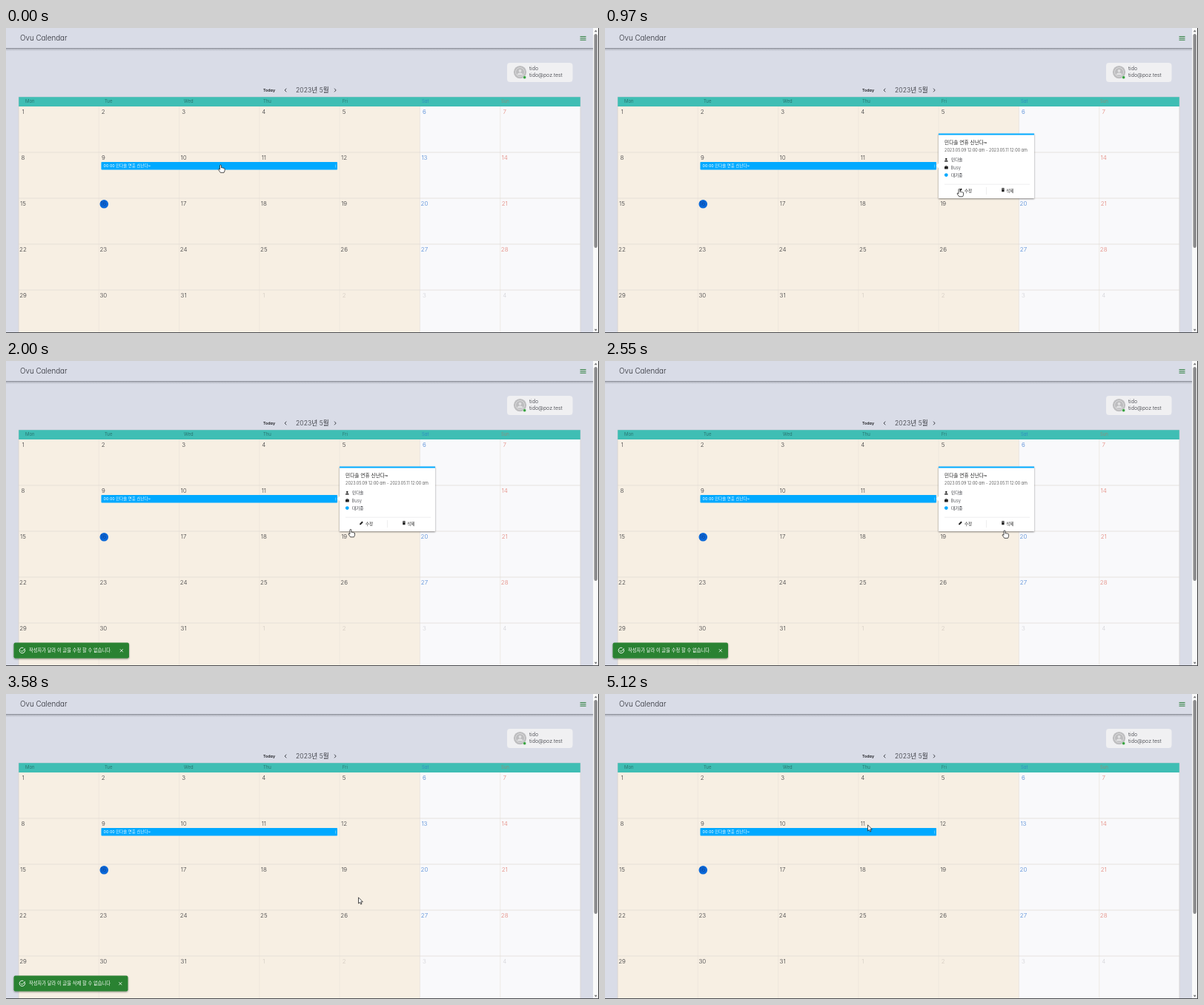
These frames come from a looping animation (800 by 412 pixels, 5150 ms). An HTML page:

```html
<!DOCTYPE html>
<html lang="ko">
<head>
<meta charset="utf-8">
<title>Calendar</title>
<style>
html, body { margin: 0; width: 100%; height: 100%; overflow: hidden; background: #d9dce7; }
svg { display: block; width: 100vw; height: 100vh; }
text {
  font-family: Inter, "Noto Sans CJK KR", "Noto Sans CJK", sans-serif;
  font-feature-settings: "cv11"; font-weight: 300; white-space: pre;
}
</style>
</head>
<body>
<svg id="stage" viewBox="0 0 800 412" preserveAspectRatio="none">
  <defs>
    <linearGradient id="drop" x2="0" y2="1">
      <stop offset="0" stop-color="#7c7f89"/>
      <stop offset=".35" stop-color="#b4b7c1"/>
      <stop offset="1" stop-color="#d9dce7"/>
    </linearGradient>
    <filter id="soft" x="-10%" y="-10%" width="120%" height="130%">
      <feDropShadow dx="0" dy="1" stdDeviation="1.2" flood-color="#000" flood-opacity=".45"/>
    </filter>
  </defs>
  <g id="page"></g>
  <g id="popup"></g>
  <g id="toast"></g>
  <circle id="ring" fill="#fff" fill-opacity=".6" stroke="#45c6ea" stroke-width="2.2"/>
  <g id="cursor" stroke="#222" stroke-width=".8" stroke-linejoin="round" fill="#fff">
    <path id="arrow" d="M0 0V8.2L1.9 6.5 3.2 9.3 4.5 8.7 3.3 6H5.8Z"/>
    <path id="hand" d="M-1 .9Q-1-.1 0-.1T1 .9V3.9Q2 3.2 2.7 4.1 3.7 3.5 4.3 4.5 5.5 4.2 5.6 5.4V7.3Q5.4 9 4.5 10.3H-.2Q-1.5 8.5-2.8 6.6-3.1 5.4-2 5.4L-1 6.3Z"/>
  </g>
</svg>
<script>
const LOOP = 5150;
const $ = id => document.getElementById(id);
const rect = (x, y, w, h, fill, more = '') =>
  `<rect x="${x}" y="${y}" width="${w}" height="${h}" fill="${fill}" ${more}/>`;
const line = (d, color, w = 0.6) =>
  `<path d="${d}" fill="none" stroke="${color}" stroke-width="${w}"/>`;
const shape = (d, fill) => `<path d="${d}" fill="${fill}"/>`;
const dot = (x, y, r, fill, more = '') =>
  `<circle cx="${x}" cy="${y}" r="${r}" fill="${fill}" ${more}/>`;
const label = (x, y, size, s, fill = '#33353b', more = '') =>
  `<text x="${x}" y="${y}" font-size="${size}" fill="${fill}" ${more}>${s}</text>`;

const LEFT = 17, TOP = 106, COL = 758 / 7, ROW = 62;
const PERSON = '민다솔';
const TITLE = PERSON + ' 연휴 신난다~';
const BLUE = '#00a9ff';

function drawTop() {
  return rect(0, 0, 800, 412, '#d9dce7') +
    rect(0, 27, 792, 4, 'url(#drop)') +
    label(19, 16.6, 9.8, 'Ovu Calendar', '#2c2e35') +
    [11.6, 13.9, 16.2].map(y => line(`M774.5 ${y}h8`, '#2b7d3b', 1)).join('') +
    rect(676, 47, 88.5, 26, '#f0f0f2', 'rx="4"') +
    dot(693.5, 59.6, 8.6, '#bdbdbf') +
    dot(693.5, 59.6, 6, 'none', 'stroke="#dededf" stroke-width=".9"') +
    dot(693.5, 57.8, 1.9, '#e2e2e3') +
    shape('M689.5 63.6Q690 60.5 693.5 60.5T697.5 63.6Z', '#e2e2e3') +
    dot(699.6, 66.7, 2.1, '#35a13c', 'stroke="#f0f0f2" stroke-width=".6"') +
    label(706, 57.3, 7, 'tido') +
    label(706, 66, 7, 'tido@poz.test') +
    label(347, 85.8, 5.3, 'Today', '#16171b', 'style="font-weight:600"') +
    line('M378.3 81.7L376.1 84 378.3 86.3M443 81.7L445.2 84 443 86.3', '#33353b', 0.9) +
    label(391, 86.9, 8.7, '2023년 5월');
}

function drawGrid() {
  const days = ['Mon', 'Tue', 'Wed', 'Thu', 'Fri', 'Sat', 'Sun'];
  let s = rect(LEFT, TOP, 5 * COL, 305, '#f7efe3') +
    rect(LEFT + 5 * COL, TOP, 2 * COL, 305, '#f9f9fb') +
    rect(LEFT, 93, 758, 13, '#3fbeb4');
  days.forEach((d, i) => {
    const color = i == 5 ? '#2a7fc4' : i == 6 ? '#a5806f' : '#235f5c';
    s += label(26 + 107 * i, 101.2, 6, d, color);
  });
  for (let c = 0; c <= 7; c++) s += line(`M${LEFT + c * COL} 106V411`, '#e9e2d9');
  for (let r = 1; r < 5; r++) s += line(`M17 ${TOP + r * ROW}H775`, '#dfd9d2', 0.7);
  s += line('M17 411V93H775V411', '#c9cbd0', 0.5);
  s += dot(132.3, 237.8, 5.8, '#0a68d8');
  for (let i = 0; i < 35; i++) {
    const c = i % 7, r = Math.floor(i / 7), next = i > 30;
    let color = c == 5 ? '#4a86d6' : c == 6 ? '#e38479' : '#3a3a3d';
    if (next) color = c > 4 ? '#d3d3d8' : '#d2cac1';
    if (i == 15) color = '#0b3f96';
    s += label(LEFT + c * COL + 6, 115.5 + r * ROW, 8, next ? i - 30 : i + 1, color,
      'text-anchor="middle"');
  }
  return s + rect(128.5, 181, 318.5, 10.5, BLUE, 'rx=".8"') +
    label(131.5, 188.2, 5.45, '00:00 ' + TITLE, '#fff', 'style="font-weight:400"') +
    line('M444.8 184.5v4', '#8fd8ff', 0.7);
}

function drawFrame() {
  return rect(792, 0, 8, 412, '#fafafa') +
    rect(793.4, 8, 4.4, 289, '#8b8b8d', 'rx="2.2"') +
    shape('M793.6 5.2L795.6 2.4 797.6 5.2ZM793.6 406.8L795.6 409.6 797.6 406.8Z', '#77787a') +
    rect(799, 0, 1, 412, '#3a3a3c') +
    rect(0, 411, 800, 1, '#4a4b50');
}

function drawPopup() {
  const ink = '#222';
  return rect(450, 142.5, 129, 87.5, '#fff', 'filter="url(#soft)"') +
    shape('M450.3 182.5L446.6 186 450.3 189.5Z', '#fff') +
    rect(450, 142.5, 129, 2, BLUE) +
    label(458, 157.2, 6.7, TITLE, ink, 'style="font-weight:400"') +
    label(458, 167.3, 5.5, '2023.05.09 12:00 am - 2023.05.11 12:00 am', '#333') +
    dot(460.3, 176.9, 1.2, ink) +
    shape('M457.8 180.6Q457.9 178.6 460.3 178.6T462.8 180.6Z', ink) +
    label(467, 180.2, 5.6, PERSON) +
    rect(458, 187, 4.8, 3.6, ink, 'rx=".5"') +
    line('M459.4 187V186.2H461.4V187', ink) +
    label(466.5, 190.6, 5.8, 'Busy') +
    dot(460.3, 198.6, 2.4, BLUE) +
    label(467, 200.8, 5.6, '대기중') +
    line('M458 211.2H573M514.5 215V225', '#e3e3e5') +
    shape('M477.2 221.2V219.8L480.4 216.6 481.8 218 478.6 221.2Z', ink) +
    label(485, 222, 5.5, '수정', ink) +
    shape('M534.8 216.6H536L536.3 216.1H537.6L537.9 216.6H539V217.3H534.8ZM535.1 217.8H538.7L538.5 221.3H535.3Z', ink) +
    label(541.3, 222, 5.5, '삭제', ink);
}

function drawToast(width, word, end) {
  const x = 10.5 + width - 10.2;
  return rect(10.5, 380.5, width, 21, '#2a8230', 'rx="2.2" filter="url(#soft)"') +
    line('M25.2 389.4A3.7 3.7 0 1 1 23.4 387.6M19.9 390.9L21.6 392.6 25.6 388.3', '#fff', 0.9) +
    label(31, 392.8, 6.25, `작성자가 달라 이 글을 ${word} 할 수 없습니다${end}`, '#fff') +
    line(`M${x - 2} 389.2l4 4m0 -4l-4 4`, '#fff', 0.8);
}

$('page').innerHTML = drawTop() + drawGrid() + drawFrame();
$('popup').innerHTML = drawPopup();

const POPUP = [300, 3250];
const CLICKS = [130, 1120, 3000];
const TOASTS = [
  { from: 1130, to: 2640, width: 155.5, word: '수정', end: '.' },
  { from: 3290, to: 4560, width: 154, word: '삭제', end: '' }
];
// time, x, y of the pointer tip
const PATH = [
  [0, 289.5, 185], [580, 289.5, 185], [970, 478, 217.5], [1120, 478, 217.5],
  [1390, 465.5, 227], [1610, 464, 227.5], [1970, 464, 227.5], [2450, 539, 229],
  [2550, 539, 229], [2880, 549, 221], [3070, 549, 221], [3550, 475.5, 274.8],
  [3600, 475.5, 274.8], [4090, 440, 262], [4330, 440, 262], [4850, 336, 208],
  [5120, 354.5, 176.8], [LOOP, 354.5, 176.8]
];

const clamp = v => Math.max(0, Math.min(1, v));
const ease = u => u * u * (3 - 2 * u);
const show = (node, on) => node.setAttribute('display', on ? 'inline' : 'none');

function pointer(t) {
  const i = Math.max(1, PATH.findIndex(p => p[0] > t));
  const [t0, x0, y0] = PATH[i - 1], [t1, x1, y1] = PATH[i];
  const u = ease((t - t0) / (t1 - t0));
  return [x0 + (x1 - x0) * u, y0 + (y1 - y0) * u];
}

let shown = null;
function renderToast(t) {
  const item = TOASTS.find(o => t >= o.from && t < o.to + 195);
  show($('toast'), item);
  if (!item) return;
  if (shown != item) $('toast').innerHTML = drawToast(item.width, item.word, item.end);
  shown = item;
  const k = ease(clamp((t - item.from) / 225)) * (1 - ease(clamp((t - item.to) / 195)));
  const sx = 0.75 + 0.25 * k, sy = 0.5625 + 0.4375 * k;
  const cx = 10.5 + item.width / 2, cy = 391;
  $('toast').setAttribute('opacity', k);
  $('toast').setAttribute('transform',
    `translate(${cx} ${cy}) scale(${sx} ${sy}) translate(${-cx} ${-cy})`);
}

function render(t) {
  const open = t >= POPUP[0] && t < POPUP[1];
  const [x, y] = pointer(t);
  const onButton = open && x > 458 && x < 573 && y > 212 && y < 230;
  const onEvent = x > 128 && x < 447 && y > 181 && y < 191.5;
  show($('popup'), open);
  renderToast(t);
  show($('hand'), onButton || onEvent);
  show($('arrow'), !(onButton || onEvent));
  $('cursor').setAttribute('transform', `translate(${x} ${y})`);

  const start = CLICKS.find(c => t >= c && t < c + 380);
  show($('ring'), start !== undefined);
  if (start !== undefined) {
    const u = (t - start) / 380;
    $('ring').setAttribute('cx', x - 1.5);
    $('ring').setAttribute('cy', y + 0.5);
    $('ring').setAttribute('r', 2.2 + 3.6 * u);
    $('ring').setAttribute('opacity', 1 - u ** 4);
  }
}

const begin = performance.now();
function tick() {
  render((performance.now() - begin) % LOOP);
  requestAnimationFrame(tick);
}
tick();
</script>
</body>
</html>
```
